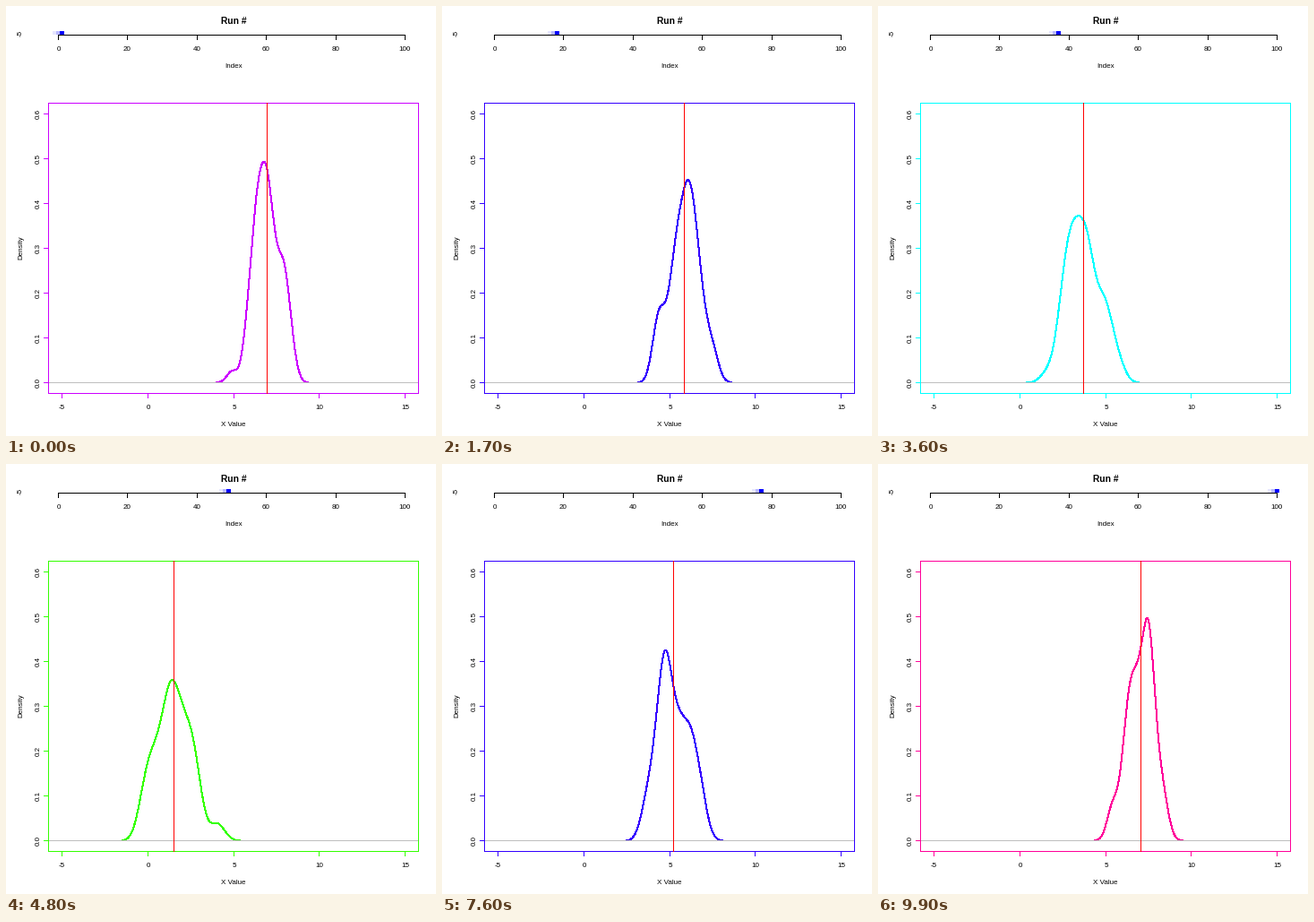
Recreate the animation shown at these times as a matplotlib script. Size 480 px wide and 480 px high, loop 10 s.

```python
import colorsys
import numpy as np
import matplotlib.pyplot as plt
from matplotlib.animation import FuncAnimation
from matplotlib.patches import Rectangle

SIZE, RUNS, N = 480, 100, 50
PX = 0.72  # points per pixel at 100 dpi
LEFT, RIGHT, TOP, BOTTOM = 47, 460, 108, 432


def val_x(v):
    return 157.8 + 19.15 * v


def den_y(d):
    return 420 - 500 * d


def idx_x(k):
    return 58 + 3.87 * k


def run(i):
    """Mean and kernel density of a sample that drifts to 0 and back."""
    gap = abs(50 - i)
    mean = np.sqrt(gap) - 0.13 * np.cos(2 * np.pi * i / 30)
    z = np.random.default_rng(i).normal(size=N)
    z = (z - z.mean()) / z.std()
    spread = 1.04 - 0.0058 * gap
    data = mean + spread * z
    bw = 0.9 * spread * N ** -0.2
    x = np.linspace(data.min() - 3 * bw, data.max() + 3 * bw, 300)
    kernels = np.exp(-0.5 * ((x[:, None] - data) / bw) ** 2)
    return mean, x, kernels.sum(axis=1) / (N * bw * np.sqrt(2 * np.pi))


runs = [run(i) for i in range(RUNS)]

fig = plt.figure(figsize=(SIZE / 100, SIZE / 100), dpi=100, facecolor="white")
ax = fig.add_axes([0, 0, 1, 1])
ax.set_xlim(0, SIZE)
ax.set_ylim(SIZE, 0)
ax.axis("off")


def bar(x, y, w, h, color="black", z=4):
    """Fill whole pixels from (x, y)."""
    return ax.add_patch(Rectangle((x, y), w, h, fc=color, ec="none", lw=0,
                                  antialiased=False, zorder=z))


def label(x, y, text, px=8, rot=0, weight="normal"):
    ax.text(x, y, text, fontsize=px * PX, family="Liberation Sans", weight=weight,
            ha="center", va="baseline", rotation=rot, rotation_mode="anchor")


# Progress strip
label(254, 20, "Run #", 10.2, weight="bold")
label(254.5, 69, "Index")
label(18, 30, "-5", rot=90)
bar(58, 32, 388, 1)
for k in range(0, 101, 20):
    x = round(idx_x(k))
    bar(x, 32, 1, 6)
    label(x + 0.5, 50, str(k))

trail = [bar(0, 28, 5, 4, shade, 3) for shade in ("#e6e6ff", "#b8b8ff", "#0000ff")]

# Density panel
w, h = RIGHT - LEFT + 1, BOTTOM - TOP + 1
tinted = [bar(LEFT, TOP, w, 1), bar(LEFT, BOTTOM, w, 1),
          bar(LEFT, TOP, 1, h), bar(RIGHT, TOP, 1, h)]
for v in range(-5, 16, 5):
    x = round(val_x(v))
    tinted.append(bar(x, BOTTOM, 1, 6))
    label(x + 0.5, 450, str(v))
for j in range(7):
    y = 420 - 50 * j
    tinted.append(bar(LEFT - 5, y, 5, 1))
    label(38, y + 0.5, f"{j / 10:.1f}", rot=90)
label(254, 469, "X Value")
label(18, 270, "Density", rot=90)

curve, = ax.plot([], [], lw=PX, antialiased=False, solid_capstyle="butt",
                 solid_joinstyle="bevel", zorder=2)
bar(LEFT, 420, w, 1, "#bebebe", 3)
mean_line = bar(0, TOP, 1, h, "#ff0000", 5)


def draw(i):
    mean, x, d = runs[i]
    tint = colorsys.hsv_to_rgb((np.floor(mean) + 2) / 10 % 1, 1, 1)
    for part in tinted:
        part.set_facecolor(tint)
    curve.set_color(tint)
    curve.set_data(val_x(x) + 0.5, den_y(d) + 0.5)
    mean_line.set_x(round(val_x(mean)))
    for k, box in enumerate(trail, i - 1):
        box.set_x(round(idx_x(k) - 2))
    return []


anim = FuncAnimation(fig, draw, frames=RUNS, interval=100, repeat=True, repeat_delay=0)
plt.show()
```
